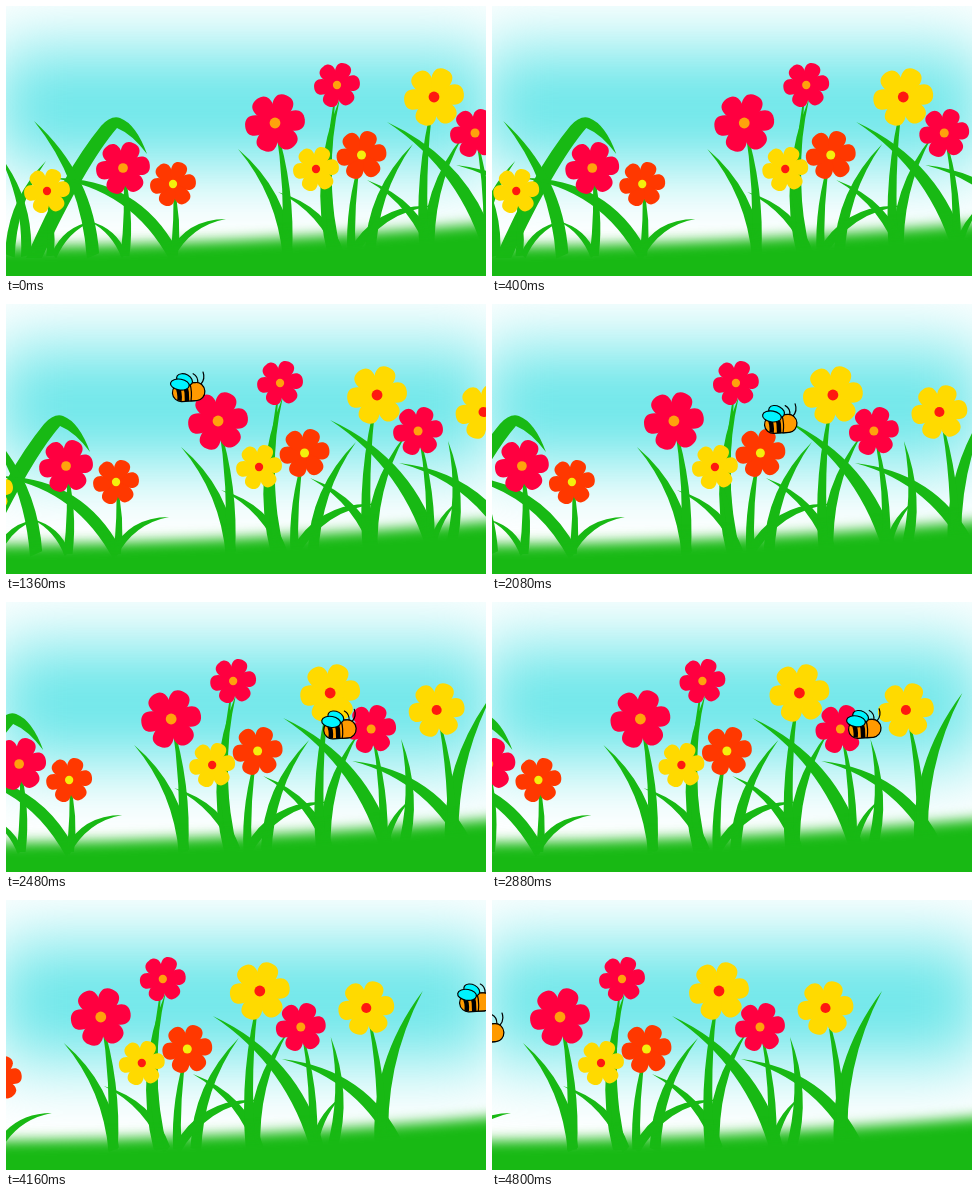
An HTML page that plays this animation: 480 px wide and 270 px high, repeating every 4840 ms.

```html
<!DOCTYPE html>
<html lang="en">
<head>
<meta charset="utf-8">
<title>Bee over a meadow</title>
<style>
  html, body { margin: 0; width: 100%; height: 100%; overflow: hidden; background: #fff; }
  svg { display: block; width: 480px; height: 270px; }
</style>
</head>
<body>
<svg viewBox="0 0 480 270">
  <defs>
    <filter id="haze" x="-50%" y="-100%" width="200%" height="300%" color-interpolation-filters="sRGB">
      <feGaussianBlur stdDeviation="33 36"/>
    </filter>
    <filter id="soft" x="-10%" y="-50%" width="120%" height="200%" color-interpolation-filters="sRGB">
      <feGaussianBlur stdDeviation="6.500"/>
    </filter>
    <path id="petal" d="M0 0C.45-.43 1-.48 1 0S.45 .43 0 0"/>
  </defs>
  <rect x="-12" y="43" width="504" height="117" fill="#69e6e9" filter="url(#haze)"/>
  <g id="meadow"></g>
  <path d="M-40 241Q240 240 520 214V320H-40Z" fill="#18b914" filter="url(#soft)"/>
  <g id="bee" stroke="#000" stroke-width="1.2" stroke-linecap="round">
    <path fill="none" d="M10-8Q11-15 6-18M13-7Q18-12 16-19"/>
    <rect x="-16" y="-9" width="32" height="18" rx="9" fill="#ff9a00"/>
    <path fill="none" stroke-width="4.5" stroke-linecap="butt" d="M-11-7Q-8 0-9.500 8M-3-9Q-1 0-2 9"/>
    <path d="M2-9H8A8.500 9 0 0 1 8 9H2Q4 0 2-9" fill="#ff9a00"/>
    <g id="wings" fill="#00f4ff">
      <ellipse rx="8.500" ry="6" transform="translate(-3-14) rotate(35)"/>
      <ellipse rx="9.500" ry="6" transform="translate(-8-9) rotate(15)"/>
    </g>
  </g>
</svg>
<script>
const LOOP = 4840, STEP = 40, SCROLL = 201 / 4800;
const BEE_IN = 560, BEE_PERIOD = 4200, SOIL = 250;
const el = id => document.getElementById(id);

// tip x, tip y, root x
const leaves = [
  [28, 115, 87], [45, 172, 168], [-8, 147, 20], [40, 155, 4], [83, 215, 118], [87, 215, 48],
  [220, 213, 165], [232, 143, 282], [272, 186, 335], [334, 92, 329], [407, 138, 364], [428, 200, 345],
  [361, 174, 428], [381, 116, 486], [457, 130, 423], [450, 159, 568], [499, 137, 500], [509, 197, 482],
  [591, 91, 550]
];

// spots: x, y, radius, lean of the stem
const blooms = [
  { petal: "#ff0040", heart: "#ffa20c", spots: [[117, 162, 27, 2], [269, 117, 30, 12], [331, 79, 23, -4], [469, 127, 25, 12]] },
  { petal: "#ff3800", heart: "#f4f00c", spots: [[167, 178, 23, 1], [355.5, 149, 25, -10]] },
  { petal: "#ffda00", heart: "#ff1810", spots: [[41, 185, 23, 3], [310, 163, 23, 18], [428, 91, 30, -9], [534.5, 108, 28, 15]] }
];

// A tapered blade; the further it leans, the more it bows outwards.
function blade(x, y, root, width, bow = 1) {
  const dx = root - x, dy = SOIL - y, len = Math.hypot(dx, dy);
  const bend = bow * Math.sign(dx) * (.14 + .09 * Math.abs(dx / dy));
  const cx = x + dx / 2 + dy * bend, cy = y + dy / 2 - dx * bend;
  const nx = dy / len * width / 2, ny = -dx / len * width / 2;
  return `<path d="M${x} ${y}Q${cx + nx} ${cy + ny} ${root + nx} ${SOIL + ny}` +
    `L${root - nx} ${SOIL - ny}Q${cx - nx} ${cy - ny} ${x} ${y}"/>`;
}

const leaf = ([x, y, root]) => blade(x, y, root, 3 + .07 * Math.hypot(root - x, SOIL - y));
const stem = ([x, y, r, lean]) => blade(x, y, x + lean, r / 3, .5);

function flower([x, y, r], heart) {
  let petals = "";
  for (let a = -7; a < 353; a += 60) petals += `<use href="#petal" transform="rotate(${a})"/>`;
  return `<g transform="translate(${x} ${y}) scale(${r})">${petals}<circle r=".18" fill="${heart}"/></g>`;
}

const foldedLeaf = '<path d="M20 252Q58 165 95 120Q105 109 114 112Q130 118 141 148Q126 128 111 122Q80 158 36 252Z"/>';
el("meadow").innerHTML =
  `<g fill="#18b914">${foldedLeaf}${leaves.map(leaf).join("")}${blooms.flatMap(b => b.spots.map(stem)).join("")}</g>` +
  blooms.map(b => `<g fill="${b.petal}">${b.spots.map(s => flower(s, b.heart)).join("")}</g>`).join("");

// The bee darts in from below, then slows down along a wave.
function beeAt(s) {
  const x = 279 * Math.log(1 + s / .18) - 19;
  return [x, 104 + 24 * Math.cos((x - 350) / 73) + 50 * Math.exp(-70 * s)];
}

function draw(now) {
  const frame = Math.floor(now % LOOP / STEP), t = frame * STEP;
  el("meadow").setAttribute("transform", `translate(${-SCROLL * t})`);

  const s = (t - BEE_IN) / BEE_PERIOD;
  el("bee").style.display = s < 0 ? "none" : "";
  if (s < 0) return;
  const [x, y] = beeAt(s % 1);
  el("bee").setAttribute("transform", `translate(${x} ${y}) rotate(-4)`);
  el("wings").setAttribute("transform", `scale(1 ${.9 + .13 * Math.sin(frame * Math.PI / 2)})`);
}

const start = performance.now();
(function tick() {
  draw(performance.now() - start);
  requestAnimationFrame(tick);
})();
</script>
</body>
</html>
```
